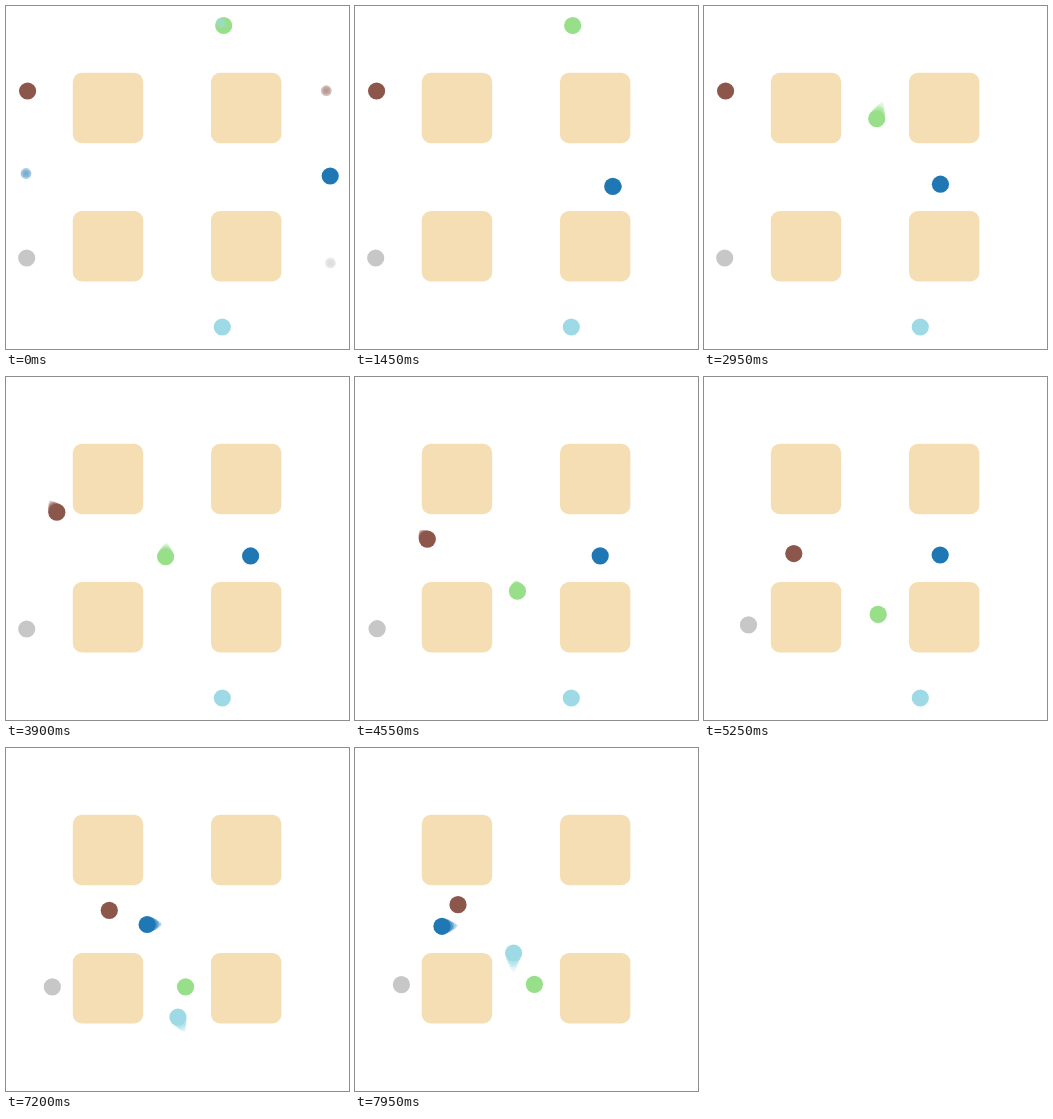
Animation, 343 px wide and 343 px high, one loop 8 s. Source, as an HTML page with a canvas:

```html
<!DOCTYPE html>
<html lang="en">
<head>
<meta charset="utf-8">
<title>Agents around blocks</title>
<style>
html, body { margin: 0; width: 100%; height: 100%; overflow: hidden; background: #fff; }
canvas { display: block; width: 343px; height: 343px; }
</style>
</head>
<body>
<canvas id="stage"></canvas>
<script>
const SIZE = 343, LOOP = 8000, STEP = 50, RELEASE = 1500;
const RADIUS = 8.6, TRAIL = 5, TRAIL_RADIUS = 9, TRAIL_ALPHA = .65;

// One agent is released every RELEASE ms and passes one waypoint per second.
// It rested at its goal before the restart.
const agents = [
  { color: '#1f77b4', goal: [20, 167.5], waypoints: [
    [324.2, 170], [275, 180], [242.5, 179.2], [236.5, 178.2], [245, 179],
    [241, 178.4], [212, 176.5], [154.5, 176.2], [83.4, 178.4]] },
  { color: '#98df8a', goal: [216.2, 321], waypoints: [
    [217.7, 19.5], [185, 79], [162, 154], [162, 212], [177.5, 242],
    [179.4, 241.4], [179.5, 237.8], [179.2, 234.5]] },
  { color: '#8c564b', goal: [320.3, 84.7], waypoints: [
    [21.6, 85], [54, 139.8], [85, 174], [98.5, 173.5], [103, 164], [103, 156.3]] },
  { color: '#c7c7c7', goal: [324.5, 257], waypoints: [
    [20.7, 252], [49.5, 246.5], [46.4, 241.3], [46.4, 238], [46.4, 235]] },
  { color: '#9edae5', goal: [215, 17], waypoints: [
    [216.3, 321], [178, 282.5], [159.2, 200.8], [207, 111]] }
];

const ctx = document.getElementById('stage').getContext('2d');
const ratio = window.devicePixelRatio || 1;
ctx.canvas.width = ctx.canvas.height = Math.round(SIZE * ratio);
ctx.scale(ratio, ratio);

// Catmull-Rom spline; missing neighbours are mirrored at the ends.
function spline(points, s) {
  const last = points.length - 1;
  const clamped = Math.min(Math.max(s, 0), last);
  const i = Math.min(Math.floor(clamped), last - 1), u = clamped - i;
  return [0, 1].map(axis => {
    const b = points[i][axis], c = points[i + 1][axis];
    const a = i > 0 ? points[i - 1][axis] : 2 * b - c;
    const d = i + 2 <= last ? points[i + 2][axis] : 2 * c - b;
    return b + u / 2 * (c - a + u * (2 * a - 5 * b + 4 * c - d + u * (3 * (b - c) + d - a)));
  });
}

function disc([x, y], radius, alpha) {
  ctx.globalAlpha = alpha;
  ctx.beginPath();
  ctx.arc(x, y, radius, 0, 2 * Math.PI);
  ctx.fill();
}

function drawBlocks() {
  ctx.globalAlpha = 1;
  ctx.fillStyle = '#f5deb3';
  for (const x of [66.8, 205]) for (const y of [66.8, 205]) {
    ctx.beginPath();
    ctx.roundRect(x, y, 70.4, 70.4, 9);
    ctx.fill();
  }
}

function drawAgent({ color, goal, waypoints }, index, ms) {
  const position = time =>
    time < -STEP ? goal : spline(waypoints, (time - index * RELEASE) / 1000);
  ctx.fillStyle = color;
  for (let age = TRAIL - 1; age > 0; age--) {
    const fade = 1 - age / TRAIL;
    disc(position(ms - age * STEP), TRAIL_RADIUS * fade, TRAIL_ALPHA * fade);
  }
  disc(position(ms), RADIUS, 1);
}

const start = performance.now();
function tick() {
  const elapsed = (performance.now() - start) % LOOP;
  const ms = Math.floor(elapsed / STEP) * STEP;
  ctx.clearRect(0, 0, SIZE, SIZE);
  drawBlocks();
  agents.forEach((agent, index) => drawAgent(agent, index, ms));
  requestAnimationFrame(tick);
}
tick();
</script>
</body>
</html>
```
